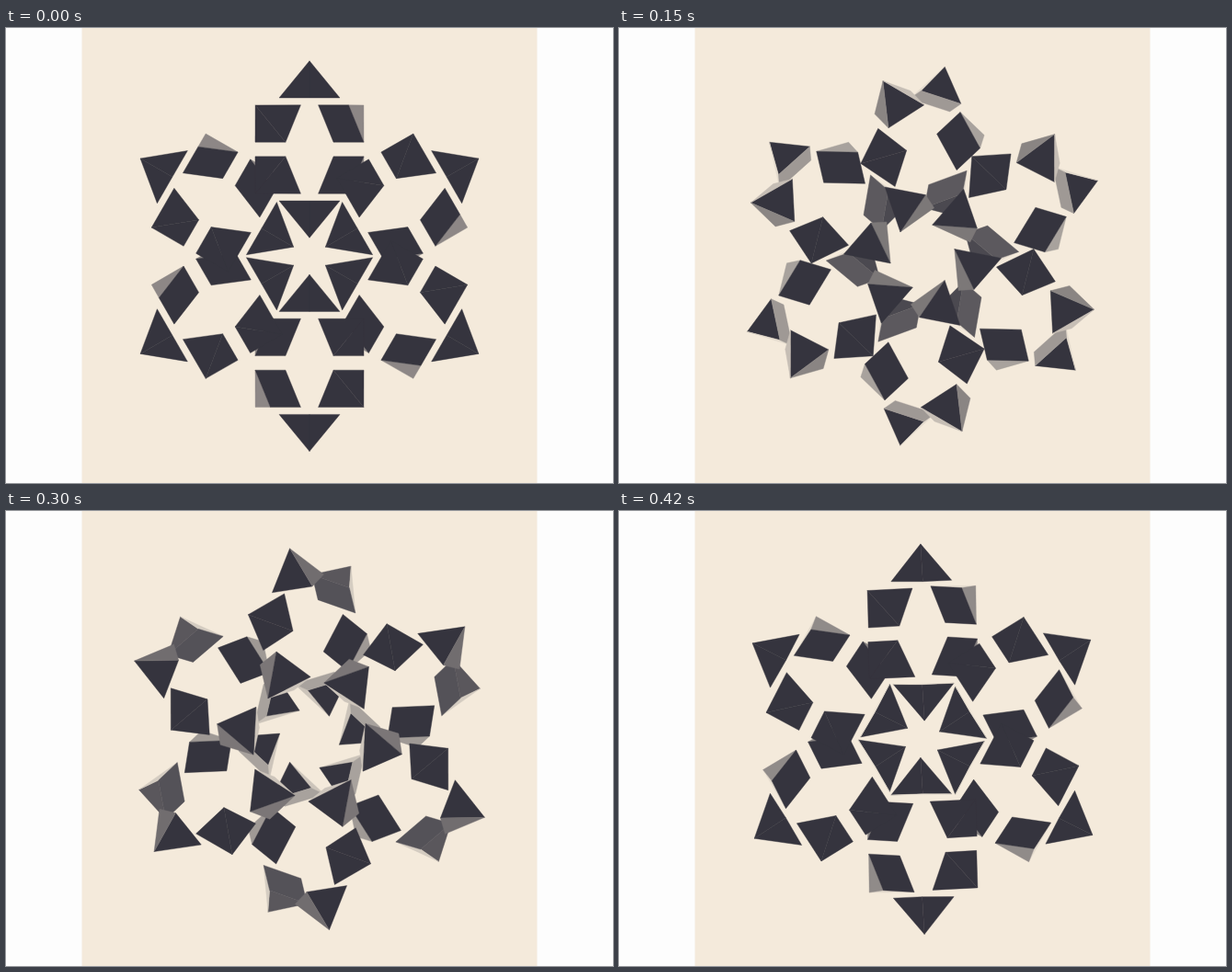
Write an HTML page with a canvas that moves like this. It is 660x495 px and loops after 0.45 s.

```html
<!DOCTYPE html>
<html lang="en">
<head>
<meta charset="utf-8">
<title>Six rings of tumbling pyramids</title>
<style>
  html, body { margin: 0; width: 100%; height: 100%; overflow: hidden; background: #fdfdfd; }
  canvas { display: block; }
</style>
</head>
<body>
<canvas id="stage" width="660" height="495"></canvas>
<script>
const ctx = document.getElementById('stage').getContext('2d');

const LOOP = 450, STEP = 30, TURN_PER_STEP = 0.0693;
const PAPER = [244, 234, 219], INK = [53, 52, 62];
const CENTER = { x: 330, y: 248.2 };
const RING_DIST = 116.2;
const TIP = 96.2, BASE = 56, HALF_DIAG = 33;
const TILT = Math.SQRT1_2;
const SIXTH = Math.PI / 3, QUARTER = Math.PI / 2;

// Ring coordinates (radial, tangential, axial) to screen x, y and depth
function project(angle, r, t, z) {
  const x = r * Math.sin(angle) + t * Math.cos(angle);
  const y = -r * Math.cos(angle) + t * Math.sin(angle);
  return { x: (x + z) * TILT, y, d: (z - x) * TILT };
}

// How much a face looks at the viewer: 1 is head on, below 0 is hidden
function facing([a, b, c]) {
  const ux = b.x - a.x, uy = b.y - a.y, ud = b.d - a.d;
  const vx = c.x - a.x, vy = c.y - a.y, vd = c.d - a.d;
  const nz = ux * vy - uy * vx;
  return nz / Math.hypot(uy * vd - ud * vy, ud * vx - ux * vd, nz);
}

function shade(f) {
  const w = Math.min(1, f * 1.78);
  return `rgb(${PAPER.map((p, i) => Math.round(p + (INK[i] - p) * w))})`;
}

function pyramid(slot, u) {
  const angle = (slot + u) * SIXTH;
  const tip = project(angle, TIP, 0, 0);
  const base = [0, 1, 2, 3].map(i => {
    const spin = (i + 0.5 + u) * QUARTER;
    return project(angle, BASE, HALF_DIAG * Math.cos(spin), HALF_DIAG * Math.sin(spin));
  });
  const sides = base.map((b, i) => [tip, b, base[(i + 1) % 4]]);
  const faces = [...sides, base.slice().reverse()]
    .map(points => ({ points, f: facing(points) }))
    .filter(face => face.f > 0.01)
    .map(({ points, f }) => ({ points, color: shade(f) }));
  return { faces, depth: project(angle, 66, 0, 0).d };
}

function drawFace({ points, color }) {
  ctx.beginPath();
  for (const p of points) ctx.lineTo(p.x, p.y);
  ctx.closePath();
  ctx.fillStyle = ctx.strokeStyle = color;
  ctx.fill();
  ctx.stroke();
}

function draw(u) {
  ctx.setTransform(1, 0, 0, 1, 0, 0);
  ctx.fillStyle = '#fdfdfd';
  ctx.fillRect(0, 0, 660, 495);
  ctx.fillStyle = `rgb(${PAPER})`;
  ctx.fillRect(82.5, 0, 495, 495);
  ctx.lineWidth = 0.4;
  ctx.lineJoin = 'round';

  const pieces = [0, 1, 2, 3, 4, 5].map(slot => pyramid(slot, u));
  pieces.sort((a, b) => a.depth - b.depth);
  for (const piece of pieces) {
    for (let ring = 0; ring < 6; ring++) {
      ctx.setTransform(1, 0, 0, 1, CENTER.x, CENTER.y);
      ctx.rotate(ring * SIXTH);
      ctx.translate(0, -RING_DIST);
      piece.faces.forEach(drawFace);
    }
  }
}

const start = performance.now();
function tick() {
  const t = (performance.now() - start) % LOOP;
  draw(Math.floor(t / STEP) * TURN_PER_STEP);
  requestAnimationFrame(tick);
}
tick();
</script>
</body>
</html>
```
